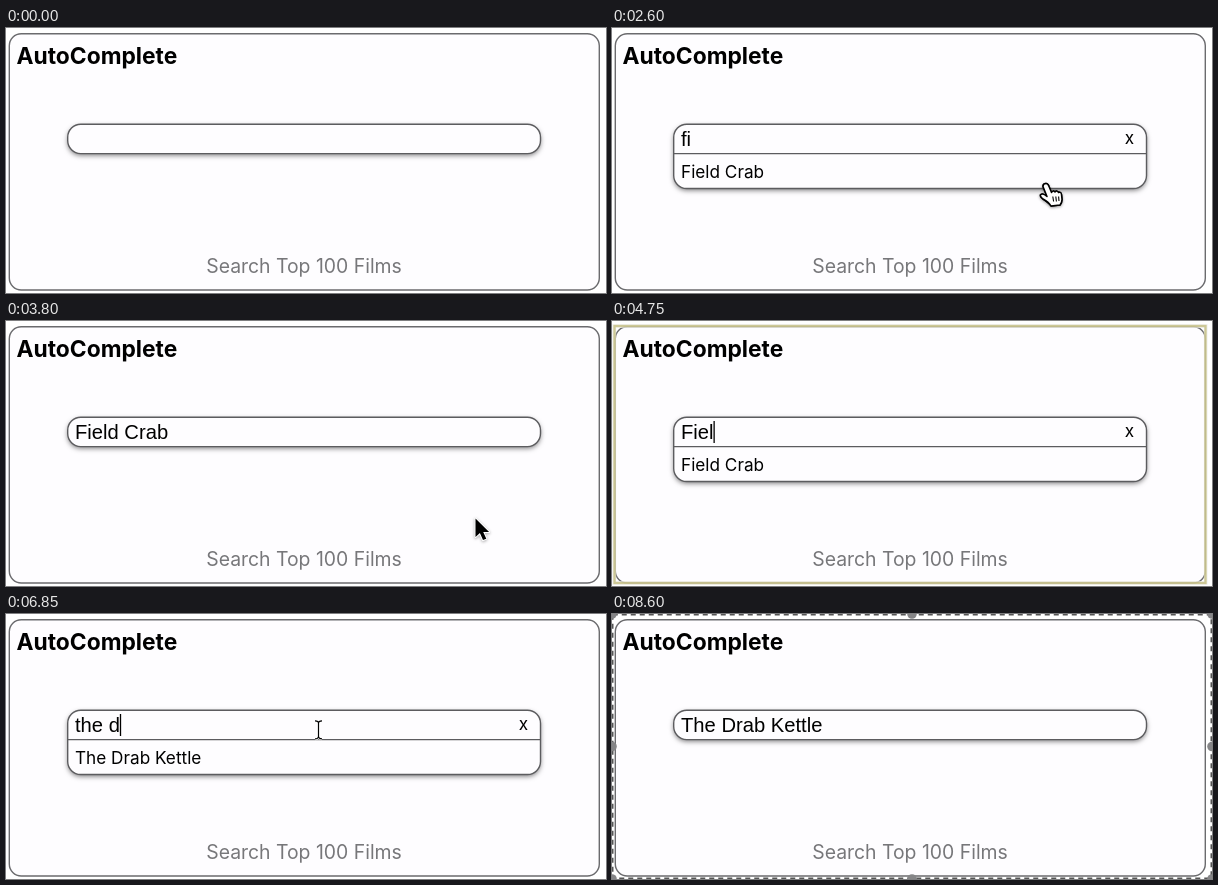
Animation, 600 px wide and 265 px high, one loop 9450 ms. Source, as an HTML page with a canvas:

```html
<!DOCTYPE html>
<html lang="en">
<head>
<meta charset="utf-8">
<title>AutoComplete</title>
<style>
  html, body { margin: 0; width: 100%; height: 100%; overflow: hidden; background: #fff; }
  canvas { display: block; width: 600px; height: 265px; }
</style>
</head>
<body>
<canvas id="stage"></canvas>
<script>
const W = 600, H = 265, LOOP = 9450, STEP = 50;
const canvas = document.getElementById('stage');
const ctx = canvas.getContext('2d');
const dpr = window.devicePixelRatio || 1;
canvas.width = W * dpr;
canvas.height = H * dpr;

const UI = 'Inter, sans-serif';
const FIELD_FONT = '20.2px "Liberation Sans", Arial, sans-serif';
const BOX = { x: 61.7, y: 96.2, w: 472.8, h: 29.4, r: 13 };

const FILMS = [
  'The Cobblemoor Departures', 'The Oatbinder', 'The Oatbinder: Part II',
  'The Drab Kettle', 'Field Crab', 'Foggy Hermit', 'Flat Velvet Ticket'
];
const FIRST = 'Field Crab', SECOND = 'The Drab Kettle';

// Render highlight, from a single update to many
const HEAT = ['#37afa9', '#63b19e', '#80b393', '#97b488', '#abb67d',
              '#beb771', '#cfb965', '#dfba57', '#efbb49', '#febc38'];

// Each event changes part of the state
const EVENTS = [
  [0, { text: '', caret: false, open: false, heat: 0 }],
  [800, { caret: true }],
  [1050, { caret: false }],
  [1250, { text: 'f', caret: true, open: true, heat: 2 }],
  [1450, { text: 'fi', heat: 3 }],
  [1550, { heat: 0 }],
  [1800, { caret: false }],
  [2050, { caret: true }],
  [2300, { caret: false }],
  [2900, { text: FIRST, open: false, heat: 2 }],
  [3100, { heat: 0 }],
  [4400, { caret: true }],
  [5150, { text: 't', open: true }],
  [5300, { text: 'th' }],
  [5500, { text: 'the' }],
  [5850, { caret: false }],
  [6000, { text: 'the ', caret: true }],
  [6200, { text: 'the d' }],
  [6450, { caret: false, heat: 0 }],
  [6650, { caret: true }],
  [7150, { text: SECOND, caret: false, open: false, heat: 3 }],
  [7400, { heat: 0 }]
];

// Held backspace clears the field
for (let i = 0; i < 9; i++) {
  const left = Math.floor(9 * (1 - i / 8));
  EVENTS.push([4550 + i * 50, { text: FIRST.slice(0, left), open: left > 0, heat: Math.min(10, i + 2) }]);
}
EVENTS.sort((a, b) => a[0] - b[0]);

// Pointer runs: visible from the first key until the end time
const RUNS = [
  { end: 1250, keys: [[300, 298, 168], [800, 240, 112]] },
  { end: 4550, keys: [[2450, 245, 112], [2600, 434, 155.5], [2900, 440, 148], [3050, 440, 148],
                      [3200, 474, 206], [3750, 474, 206], [3800, 469.5, 197.5], [4350, 300, 111]] },
  { end: 8200, keys: [[6800, 300, 111], [7000, 380, 142], [7200, 397.5, 139.5], [7350, 397.5, 139.5],
                      [7600, 393, 176], [7750, 393, 176], [8200, 447, 266]] }
];

function stateAt(t) {
  const s = {};
  for (const [at, change] of EVENTS) if (at <= t) Object.assign(s, change);
  s.rows = s.open
    ? FILMS.filter(f => f.toLowerCase().startsWith(s.text.toLowerCase())).slice(0, 3)
    : [];
  return s;
}

function pointerAt(t) {
  const run = RUNS.find(r => t >= r.keys[0][0] && t < r.end);
  if (!run) return null;
  const keys = run.keys;
  const i = keys.findIndex(k => k[0] > t);
  if (i < 0) {
    const last = keys[keys.length - 1];
    return { x: last[1], y: last[2] };
  }
  const a = keys[i - 1], b = keys[i];
  const u = (t - a[0]) / (b[0] - a[0]);
  const e = u * u * (3 - 2 * u);
  return { x: a[1] + (b[1] - a[1]) * e, y: a[2] + (b[2] - a[2]) * e };
}

function text(str, x, y, font, color = '#000', align = 'left') {
  ctx.font = font;
  ctx.fillStyle = color;
  ctx.textAlign = align;
  ctx.fillText(str, x, y);
}

function rounded(x, y, w, h, r) {
  ctx.beginPath();
  ctx.roundRect(x, y, w, h, r);
}

function line(x1, y1, x2, y2) {
  ctx.beginPath();
  ctx.moveTo(x1, y1);
  ctx.lineTo(x2, y2);
  ctx.stroke();
}

function drawCard(heat) {
  rounded(3.3, 5.7, 590, 256.3, 12);
  ctx.fillStyle = '#fefdff';
  ctx.fill();
  ctx.strokeStyle = '#6b6b6e';
  ctx.lineWidth = 1.4;
  ctx.stroke();
  if (heat) {
    ctx.save();
    ctx.globalAlpha = 0.7;
    ctx.strokeStyle = '#f0f0f0';
    ctx.lineWidth = 4;
    ctx.strokeRect(2.2, 5, 591.6, 257);
    ctx.strokeStyle = HEAT[heat - 1];
    ctx.lineWidth = 2.4;
    ctx.strokeRect(2.5, 5, 591, 257);
    ctx.restore();
  }
  text('AutoComplete', 10.5, 35.5, 'bold 22.8px ' + UI);
  text('Search Top 100 Films', 298, 244.5, '19.4px ' + UI, '#77777a', 'center');
}

function drawField(s) {
  const n = s.rows.length;
  const bottom = n ? 134.5 + 26 * n : BOX.y + BOX.h;
  ctx.save();
  ctx.shadowColor = 'rgba(0,0,0,.5)';
  ctx.shadowBlur = 5 * dpr;
  ctx.shadowOffsetY = 2 * dpr;
  rounded(BOX.x, BOX.y, BOX.w, bottom - BOX.y, BOX.r);
  ctx.fillStyle = '#fefdff';
  ctx.fill();
  ctx.restore();
  ctx.strokeStyle = '#5c5c5f';
  ctx.lineWidth = 1.4;
  ctx.stroke();

  text(s.text, 69, 117.5, FIELD_FONT);
  if (s.caret) {
    const x = 69.6 + ctx.measureText(s.text).width;
    ctx.strokeStyle = '#000';
    ctx.lineWidth = 1.3;
    line(x, 100, x, 122);
  }
  if (n) {
    ctx.strokeStyle = '#5c5c5f';
    ctx.lineWidth = 1.2;
    line(BOX.x, 125.6, BOX.x + BOX.w, 125.6);
    text('x', 517.5, 115.5, '17.2px ' + UI, '#000', 'center');
    s.rows.forEach((row, i) => text(row, 69, 150.3 + 27 * i, '17.2px ' + UI));
  }
  return bottom;
}

const ARROW = new Path2D('M0 0V18.6L4.4 14.6L7.5 21.6L10.8 20.2L7.7 13.4H13.6Z');
const HAND = new Path2D('M-3 3Q-3 0 0 0Q2 0 3 3L5.5 9Q7 6.5 9 8.5Q11 6.5 12.5 9Q15 8 15.5 11' +
  'L16 16Q16 19 14 21.5L5 22.5Q3 19 -3 15.5Q-7 12 -5 11Q-3 9.5 1 13Z');
const FINGERS = new Path2D('M6.8 13L7.6 18M9.8 13L10.4 18M12.6 13L13 17.5');
const IBEAM = new Path2D('M-3.5 -9Q0 -9 0 -6.5Q0 -9 3.5 -9M0 -7V7M-3.5 9Q0 9 0 6.5Q0 9 3.5 9');

function drawPointer(p, s, bottom) {
  const inside = p.x > BOX.x && p.x < BOX.x + BOX.w && p.y > BOX.y && p.y < bottom;
  ctx.save();
  ctx.translate(p.x, p.y);
  ctx.lineJoin = 'round';
  if (inside && p.y < BOX.y + BOX.h) {
    ctx.strokeStyle = '#fff';
    ctx.lineWidth = 2.6;
    ctx.stroke(IBEAM);
    ctx.strokeStyle = '#000';
    ctx.lineWidth = 1.2;
    ctx.stroke(IBEAM);
  } else {
    const hand = inside && s.open;
    const shape = hand ? HAND : ARROW;
    ctx.shadowColor = 'rgba(0,0,0,.35)';
    ctx.shadowBlur = 3 * dpr;
    ctx.shadowOffsetY = dpr;
    ctx.strokeStyle = hand ? '#000' : '#fff';
    ctx.fillStyle = hand ? '#fff' : '#000';
    ctx.lineWidth = hand ? 1.5 : 2;
    if (hand) ctx.fill(shape);
    ctx.stroke(shape);
    ctx.shadowColor = 'transparent';
    ctx.fill(shape);
    if (hand) {
      ctx.stroke(shape);
      ctx.lineWidth = 1.1;
      ctx.stroke(FINGERS);
    }
  }
  ctx.restore();
}

// Dashed crop frame with round handles
function drawFrame() {
  ctx.save();
  ctx.strokeStyle = '#555';
  ctx.lineWidth = 1.5;
  ctx.setLineDash([5, 4]);
  ctx.strokeRect(0.75, 0.75, W - 1.5, H - 1.5);
  ctx.restore();
  ctx.fillStyle = '#858587';
  for (const x of [0, W / 2, W]) {
    for (const y of [0, H / 2, H]) {
      if (x === W / 2 && y === H / 2) continue;
      ctx.beginPath();
      ctx.arc(x, y, 4.8, 0, Math.PI * 2);
      ctx.fill();
    }
  }
}

function draw(now) {
  const t = Math.floor((now % LOOP) / STEP) * STEP;
  const s = stateAt(t);
  ctx.setTransform(dpr, 0, 0, dpr, 0, 0);
  ctx.fillStyle = '#fff';
  ctx.fillRect(0, 0, W, H);
  drawCard(s.heat);
  const bottom = drawField(s);
  const p = pointerAt(t);
  if (p) drawPointer(p, s, bottom);
  if (t >= 8600) drawFrame();
}

const start = performance.now();
function tick() {
  draw(performance.now() - start);
  requestAnimationFrame(tick);
}
tick();
</script>
</body>
</html>
```
